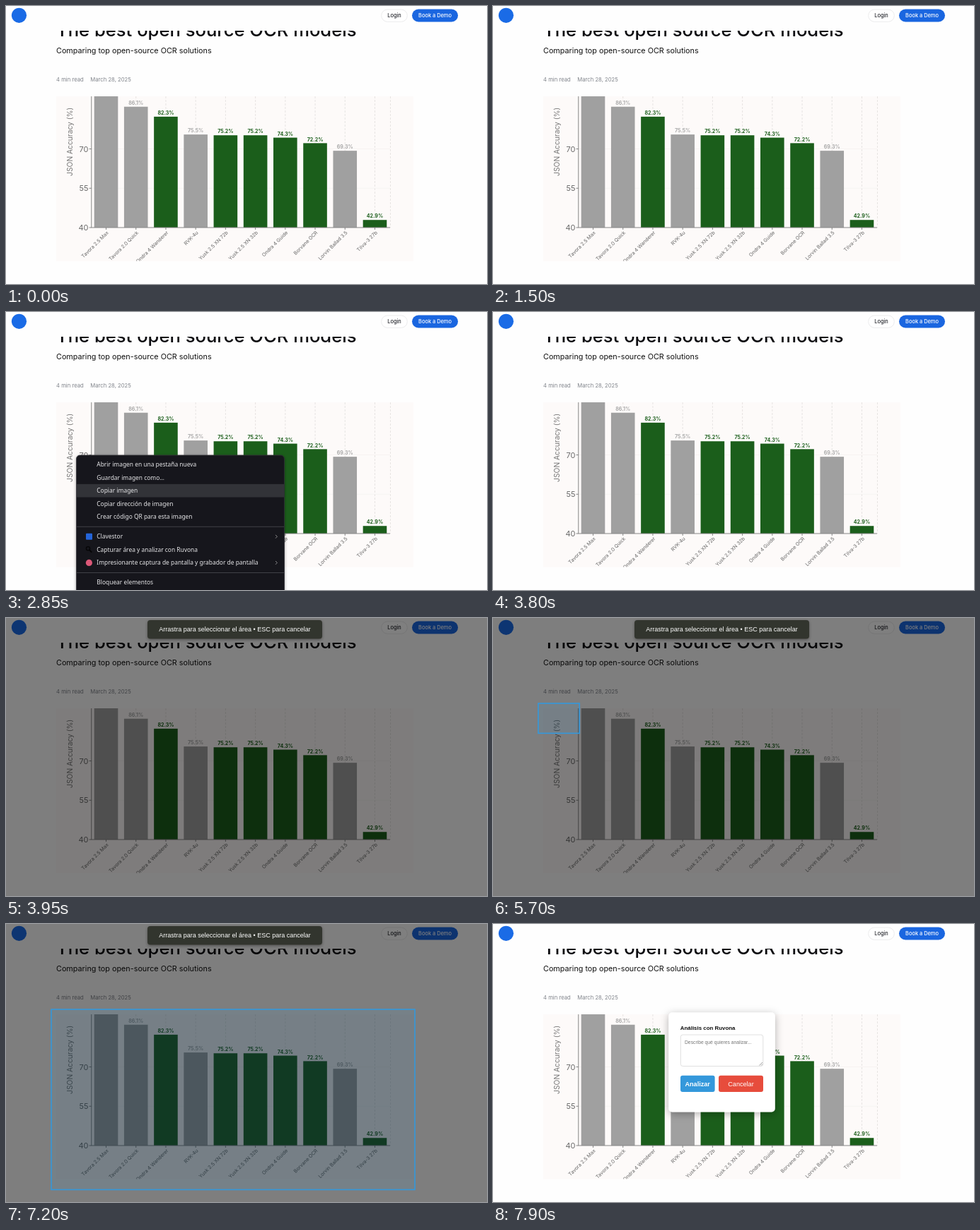
An HTML page for the animation above (8000 ms loop, 680 by 394 pixels).

```html
<!DOCTYPE html>
<html lang="es">
<head>
<meta charset="utf-8">
<title>Selección de área</title>
<style>
html, body { margin: 0; width: 100%; height: 100%; overflow: hidden; background: #fefefe; }
svg { display: block; width: 100vw; height: 100vh; }
text { white-space: pre; }
.inter { font-family: Inter, sans-serif; }
.menu { font-family: "Noto Sans", sans-serif; font-size: 8.42px; fill: #e6e6e8; }
.arial { font-family: "Liberation Sans", Arial, sans-serif; }
</style>
</head>
<body>
<svg id="stage" viewBox="0 0 680 394" preserveAspectRatio="none">
  <defs>
    <clipPath id="chartClip"><rect x="71" y="128" width="505" height="233.5"/></clipPath>
    <clipPath id="titleClip"><rect x="60" y="35" width="480" height="25"/></clipPath>
    <filter id="shadow" x="-20%" y="-20%" width="140%" height="150%">
      <feDropShadow dx="0" dy="2.5" stdDeviation="6" flood-opacity=".3"/>
    </filter>
    <filter id="softShadow" x="-10%" y="-40%" width="120%" height="200%">
      <feDropShadow dx="0" dy="1.5" stdDeviation="2" flood-opacity=".35"/>
    </filter>
  </defs>

  <rect width="680" height="394" fill="#fefefe"/>
  <g class="inter">
    <g clip-path="url(#titleClip)">
      <text x="71" y="43" font-size="25.6" font-weight="500" fill="#0b0b0f">The best open source OCR models</text>
    </g>
    <text x="71" y="67.2" font-size="10.8" fill="#111">Comparing top open-source OCR solutions</text>
    <g font-size="7.7" fill="#80848b">
      <text x="71" y="106.6">4 min read</text>
      <text x="119.3" y="106.6">March 28, 2025</text>
    </g>
    <circle cx="18.5" cy="13.3" r="10.6" fill="#1a6be6"/>
    <rect x="530.7" y="5" width="36.6" height="17.3" rx="8.6" fill="#fff" stroke="#e6e6e8" stroke-width=".8"/>
    <rect x="574" y="4.5" width="65" height="18" rx="9" fill="#1a66e0"/>
    <g font-size="7.4" font-weight="500" text-anchor="middle">
      <text x="549" y="16.3" fill="#2b2d33">Login</text>
      <text x="606.5" y="16.3" fill="#fff">Book a Demo</text>
    </g>
    <g id="chart" clip-path="url(#chartClip)"></g>
  </g>

  <g id="menu"></g>

  <g id="capture">
    <rect width="680" height="394" opacity=".5"/>
    <rect id="selection" x="64" y="121" fill="#3498db" fill-opacity=".1" stroke="#3498db" stroke-width="1.6"/>
    <rect x="200" y="3" width="247" height="26.5" rx="4" fill="#33352f" filter="url(#softShadow)"/>
    <text class="arial" x="323.5" y="19.2" font-size="9.03" fill="#fff" text-anchor="middle">Arrastra para seleccionar el área • ESC para cancelar</text>
  </g>

  <g id="dialog" class="arial">
    <rect x="248.3" y="125.5" width="150.5" height="141" rx="5" fill="#fff" filter="url(#shadow)"/>
    <text x="264.8" y="150" font-size="7.9" font-weight="700" fill="#111">Análisis con Ruvona</text>
    <rect x="265.3" y="157" width="116.5" height="44.5" rx="3" fill="#fff" stroke="#d8d8d8" stroke-width=".8"/>
    <text x="271" y="169.6" font-size="6.76" fill="#777">Describe qué quieres analizar...</text>
    <path d="M376.5 200.5l4.5-4.5M379 200.5l2-2" stroke="#777" stroke-width=".7"/>
    <rect x="265" y="214.8" width="48.6" height="23.2" rx="3" fill="#3498db"/>
    <rect x="319" y="214.8" width="63" height="23.2" rx="3" fill="#e74c3c"/>
    <g font-size="9.1" fill="#fff" text-anchor="middle">
      <text x="289.2" y="229.6" font-weight="700">Analizar</text>
      <text x="350.5" y="229.6">Cancelar</text>
    </g>
  </g>

  <rect id="flash" width="680" height="394" fill="#004b00"/>
</svg>

<script>
const LOOP = 8000;
const el = id => document.getElementById(id);
const show = (id, on) => el(id).setAttribute('display', on ? 'inline' : 'none');
const line = (x1, y1, x2, y2, attrs) =>
  `<line x1="${x1}" y1="${y1}" x2="${x2}" y2="${y2}" ${attrs}/>`;

// Chart: name, accuracy, open source or not
const models = [
  ['Tavora 2.5 Max', 92, 0], ['Tavora 2.0 Quick', 86.1, 0],
  ['Ondra 4 Wanderer', 82.3, 1], ['RVK-4u', 75.5, 0],
  ['Yusk 2.5 XN 72b', 75.2, 1], ['Yusk 2.5 XN 32b', 75.2, 1],
  ['Ondra 4 Guide', 74.3, 1], ['Borvane OCR', 72.2, 1],
  ['Lorvin Ballad 3.5', 69.3, 0], ['Tilva-3 27b', 42.9, 1]
];
const GREEN = '#1b5e1b', GREY = '#a0a0a0', BASE = 314;
const barX = i => 141.5 + 42.22 * i;
const valueY = v => BASE - (v - 40) * 3.715;

function buildChart() {
  const grid = 'stroke="#dedcda" stroke-width=".7" stroke-dasharray="3 2"';
  const axis = 'stroke="#858585" stroke-width="1"';
  let s = '<rect x="71" y="128" width="505" height="234" fill="#fdfaf9"/>';
  models.forEach((m, i) => s += line(barX(i), 128, barX(i), BASE, grid));
  s += line(543.5, 128, 543.5, BASE, grid);
  for (const v of [70, 55]) s += line(121, valueY(v), 543, valueY(v), 'stroke="#f1eeec" stroke-width=".6"');

  models.forEach(([name, value, open], i) => {
    const x = barX(i), y = Math.max(128, valueY(value)), color = open ? GREEN : GREY;
    s += `<rect x="${x - 16.8}" y="${y}" width="33.6" height="${BASE - y}" fill="${color}"/>`;
    if (i) s += `<text x="${x}" y="${y - 2.8}" font-size="7.1" font-weight="700" text-anchor="middle" fill="${open ? GREEN : '#a9a9a9'}">${value}%</text>`;
    s += line(x, BASE, x, BASE + 3, axis);
    s += `<text transform="translate(${x + 4} 321.7) rotate(-45)" font-size="7" text-anchor="end" fill="#666">${name}</text>`;
  });

  s += line(120.8, 128, 120.8, BASE, axis) + line(120.8, BASE, 543, BASE, axis);
  for (const v of [70, 55, 40]) {
    s += line(117.5, valueY(v), 121, valueY(v), axis);
    s += `<text x="116.5" y="${valueY(v) + 4.1}" font-size="11" text-anchor="end" fill="#6b6b6b">${v}</text>`;
  }
  s += '<text transform="translate(93.6 192.3) rotate(-90)" font-size="10.25" text-anchor="middle" fill="#777">JSON Accuracy (%)</text>';
  el('chart').innerHTML = s;
}

// Context menu: label, row centre, has submenu
const items = [
  ['Abrir imagen en una pestaña nueva', 216],
  ['Guardar imagen como…', 234.6],
  ['Copiar imagen', 253.2],
  ['Copiar dirección de imagen', 271.8],
  ['Crear código QR para esta imagen', 290.4],
  ['Clavestor', 318.3, true],
  ['Capturar área y analizar con Ruvona', 336.8],
  ['Impresionante captura de pantalla y grabador de pantalla', 355.4, true],
  ['Bloquear elementos', 383.4]
];

function buildMenu() {
  let s = '<rect x="99.5" y="203" width="294" height="210" rx="5" fill="#18191e" stroke="#303136" stroke-width=".8" filter="url(#softShadow)"/>';
  s += '<rect id="hover" x="100" width="293" height="18.6" fill="#323338"/>';
  for (const y of [304.3, 369.5]) s += line(100, y, 393, y, 'stroke="#46474c" stroke-width=".9"');
  for (const [label, y, submenu] of items) {
    s += `<text class="menu" x="128.3" y="${y + 3}">${label}</text>`;
    if (submenu) s += `<path d="M381 ${y - 2.4}l2.4 2.4-2.4 2.4" fill="none" stroke="#aaa" stroke-width=".8"/>`;
  }
  s += '<rect x="113" y="313.8" width="9" height="9" rx="1" fill="#2464d8"/>';
  s += '<g fill="none" stroke="#050506"><circle cx="116" cy="335.3" r="2.6" stroke-width="1.3"/><path d="M118 337.4l3.2 3.2" stroke-width="1.8"/></g>';
  s += '<circle cx="117.4" cy="355.4" r="4.6" fill="#dc5878"/>';
  el('menu').innerHTML = s;
}

// Start time of each hovered row, in menu order
const hoverTimes = [2550, 2650, 2850, 3000, 3100, 3250, 3400];

// Dragged corner: time, x, y, easing into the point
const drag = [
  [5500, 65, 122, p => p],
  [6350, 390, 357, p => p ** 1.2],
  [6850, 580.5, 377, p => 1 - (1 - p) ** 1.5],
  [7049, 580.5, 377, p => p],
  [7050, 579, 376.5, p => p],
  [7199, 579, 376.5, p => p],
  [7200, 578, 376.5, p => p]
];

function corner(t) {
  const n = drag.findIndex(k => t < k[0]);
  if (n < 0) return drag[drag.length - 1].slice(1, 3);
  const [t0, x0, y0] = drag[n - 1], [t1, x1, y1, ease] = drag[n];
  const p = ease((t - t0) / (t1 - t0));
  return [x0 + (x1 - x0) * p, y0 + (y1 - y0) * p];
}

function render(t) {
  show('flash', t >= 2100 && t < 2300);
  show('menu', t >= 2300 && t < 3800);
  show('capture', t >= 3850 && t < 7800);
  show('dialog', t >= 7850);

  const row = hoverTimes.filter(h => t >= h).length - 1;
  show('hover', row >= 0);
  if (row >= 0) el('hover').setAttribute('y', items[row][1] - 9.3);

  const selecting = t >= 5550;
  show('selection', selecting);
  if (selecting) {
    const [x, y] = corner(Math.floor(t / 50) * 50);
    el('selection').setAttribute('width', x - 64);
    el('selection').setAttribute('height', y - 121);
  }
}

buildChart();
buildMenu();
const start = performance.now();
function tick() {
  render((performance.now() - start) % LOOP);
  requestAnimationFrame(tick);
}
render(0);
requestAnimationFrame(tick);
</script>
</body>
</html>
```
